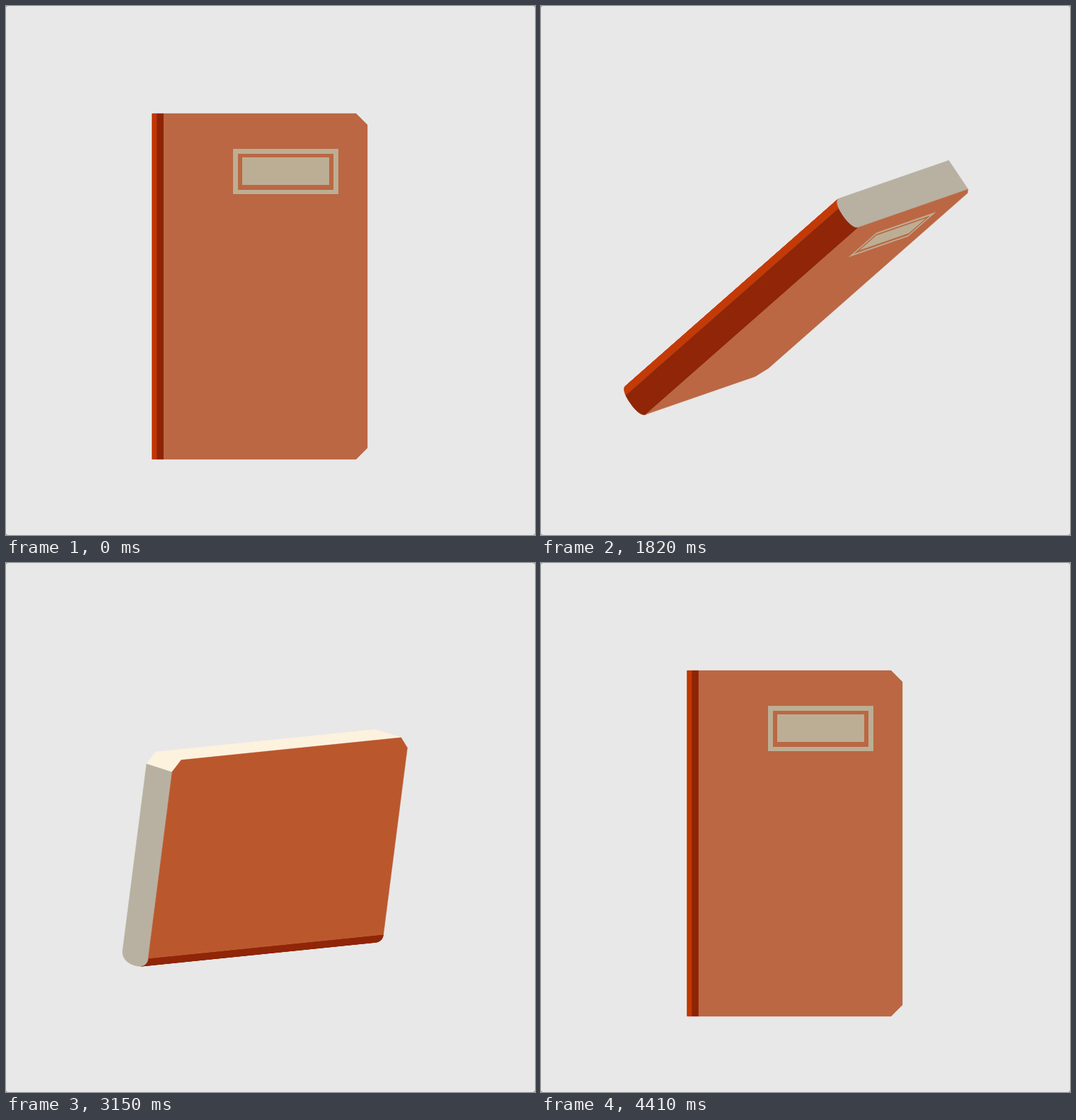
These frames come from a looping animation (748x748 px, 4480 ms). An HTML page with a canvas:

```html
<!DOCTYPE html>
<html lang="en">
<head>
<meta charset="utf-8">
<title>Spinning notebook</title>
<style>
  html, body { margin: 0; width: 100%; height: 100%; overflow: hidden; background: #8a8a8a; }
  canvas { display: block; width: 748px; height: 748px; }
</style>
</head>
<body>
<canvas id="stage" width="748" height="748"></canvas>
<script>
const ctx = document.getElementById('stage').getContext('2d');

const LOOP = 4480, STEP = 70, SPIN_START = 980, SPIN_END = 4410;

// Book axes: x away from the spine, y down the cover, z from front to back.
const WIDTH = 288, HEIGHT = 489, DEPTH = 50, CHAMFER = 16, BULGE = 16;
const PIVOT = [142.2, 246.3, 24.2];
const CENTER = [365.2, 398.3];
const AXIS = [0.7025, -0.6795, 0.2117];

// Each material has a lit and a shaded tone.
const COLORS = {
  front: ['#ff9063', '#bb6743'],
  back: ['#ff7840', '#bb572d'],
  spine: ['#c43a08', '#902808'],
  pages: ['#fcf2de', '#b8b1a1'],
  label: ['#ffebc8', '#bcae94']
};

// The spine profile is half a slightly squared ellipse.
const SPINE_PARTS = 72, SQUARENESS = 0.89;
const squared = n => Math.sign(n) * Math.abs(n) ** SQUARENESS;
const spine = Array.from({ length: SPINE_PARTS + 1 }, (_, i) => {
  const a = Math.PI * i / SPINE_PARTS;
  return [-BULGE * squared(Math.sin(a)), DEPTH / 2 * (1 - squared(Math.cos(a)))];
});

const inner = WIDTH - CHAMFER, low = HEIGHT - CHAMFER;
const cover = [[0, 0], [inner, 0], [WIDTH, CHAMFER], [WIDTH, low], [inner, HEIGHT], [0, HEIGHT]];

let basis;

function setRotation(angle) {
  const c = Math.cos(angle), s = Math.sin(angle), k = 1 - c;
  const [x, y, z] = AXIS;
  basis = [
    [c + k * x * x, k * x * y - s * z, k * x * z + s * y],
    [k * x * y + s * z, c + k * y * y, k * y * z - s * x],
    [k * x * z - s * y, k * y * z + s * x, c + k * z * z]
  ];
}

const rotate = v => basis.map(r => r[0] * v[0] + r[1] * v[1] + r[2] * v[2]);

function project(p) {
  const r = rotate(p.map((n, i) => n - PIVOT[i]));
  return [CENTER[0] + r[0], CENTER[1] + r[1]];
}

const facesViewer = normal => rotate(normal)[2] < -1e-6;

function toneOf(normal) {
  const [x, y] = rotate(normal);
  return -x - 1.25 * y > 0.727 ? 0 : 1;
}

function addPolygon(points) {
  points.forEach((p, i) => {
    const [x, y] = project(p);
    if (i) ctx.lineTo(x, y); else ctx.moveTo(x, y);
  });
  ctx.closePath();
}

// A hairline in the fill color closes the seams between faces.
function paint(color) {
  ctx.fillStyle = ctx.strokeStyle = color;
  ctx.fill();
  ctx.stroke();
}

function drawFace(points, normal, material) {
  if (!facesViewer(normal)) return false;
  ctx.beginPath();
  addPolygon(points);
  paint(COLORS[material][toneOf(normal)]);
  return true;
}

function drawSpine() {
  const parts = [[], []];
  for (let i = 0; i < SPINE_PARTS; i++) {
    const [x0, z0] = spine[i], [x1, z1] = spine[i + 1];
    const len = Math.hypot(x1 - x0, z1 - z0);
    const normal = [(z0 - z1) / len, 0, (x1 - x0) / len];
    if (!facesViewer(normal)) continue;
    parts[toneOf(normal)].push([[x0, 0, z0], [x1, 0, z1], [x1, HEIGHT, z1], [x0, HEIGHT, z0]]);
  }
  parts.forEach((quads, tone) => {
    ctx.beginPath();
    quads.forEach(addPolygon);
    paint(COLORS.spine[tone]);
  });
}

function drawPages() {
  for (const [y, dir] of [[0, -1], [HEIGHT, 1]]) {
    const end = spine.map(([x, z]) => [x, y, z]);
    drawFace([...end, [inner, y, DEPTH], [inner, y, 0]], [0, dir, 0], 'pages');
  }
  for (let i = 1; i < 4; i++) {
    const [x0, y0] = cover[i], [x1, y1] = cover[i + 1];
    const len = Math.hypot(x1 - x0, y1 - y0);
    drawFace(
      [[x0, y0, 0], [x1, y1, 0], [x1, y1, DEPTH], [x0, y0, DEPTH]],
      [(y1 - y0) / len, (x0 - x1) / len, 0],
      'pages'
    );
  }
}

function drawLabel(tone) {
  const rect = (x0, y0, x1, y1, material) => {
    ctx.beginPath();
    addPolygon([[x0, y0, 0], [x1, y0, 0], [x1, y1, 0], [x0, y1, 0]]);
    ctx.fillStyle = COLORS[material][tone];
    ctx.fill();
  };
  rect(98, 50, 247, 114, 'label');
  rect(105, 57, 240, 108, 'front');
  rect(111, 62, 234, 101, 'label');
}

function drawBook() {
  ctx.lineWidth = 0.4;
  ctx.lineJoin = 'round';
  drawSpine();
  drawPages();
  drawFace(cover.map(([x, y]) => [x, y, DEPTH]), [0, 0, 1], 'back');
  const frontNormal = [0, 0, -1];
  if (drawFace(cover.map(([x, y]) => [x, y, 0]), frontNormal, 'front')) {
    drawLabel(toneOf(frontNormal));
  }
}

// One full turn that starts a little slow and stops hard.
function turnAt(time) {
  const x = Math.min(1, Math.max(0, (time - SPIN_START) / (SPIN_END - SPIN_START)));
  return 2 * Math.PI * (x - 0.13 * x * (1 - x) * (1 - 0.92 * x));
}

function drawBackground() {
  ctx.clearRect(0, 0, 748, 748);
  ctx.fillStyle = '#e8e8e8';
  ctx.beginPath();
  ctx.roundRect(0, 0, 748, 748, 3);
  ctx.fill();
}

const start = performance.now();

function render() {
  const elapsed = (performance.now() - start) % LOOP;
  setRotation(turnAt(Math.floor(elapsed / STEP) * STEP));
  drawBackground();
  drawBook();
  requestAnimationFrame(render);
}

render();
</script>
</body>
</html>
```
